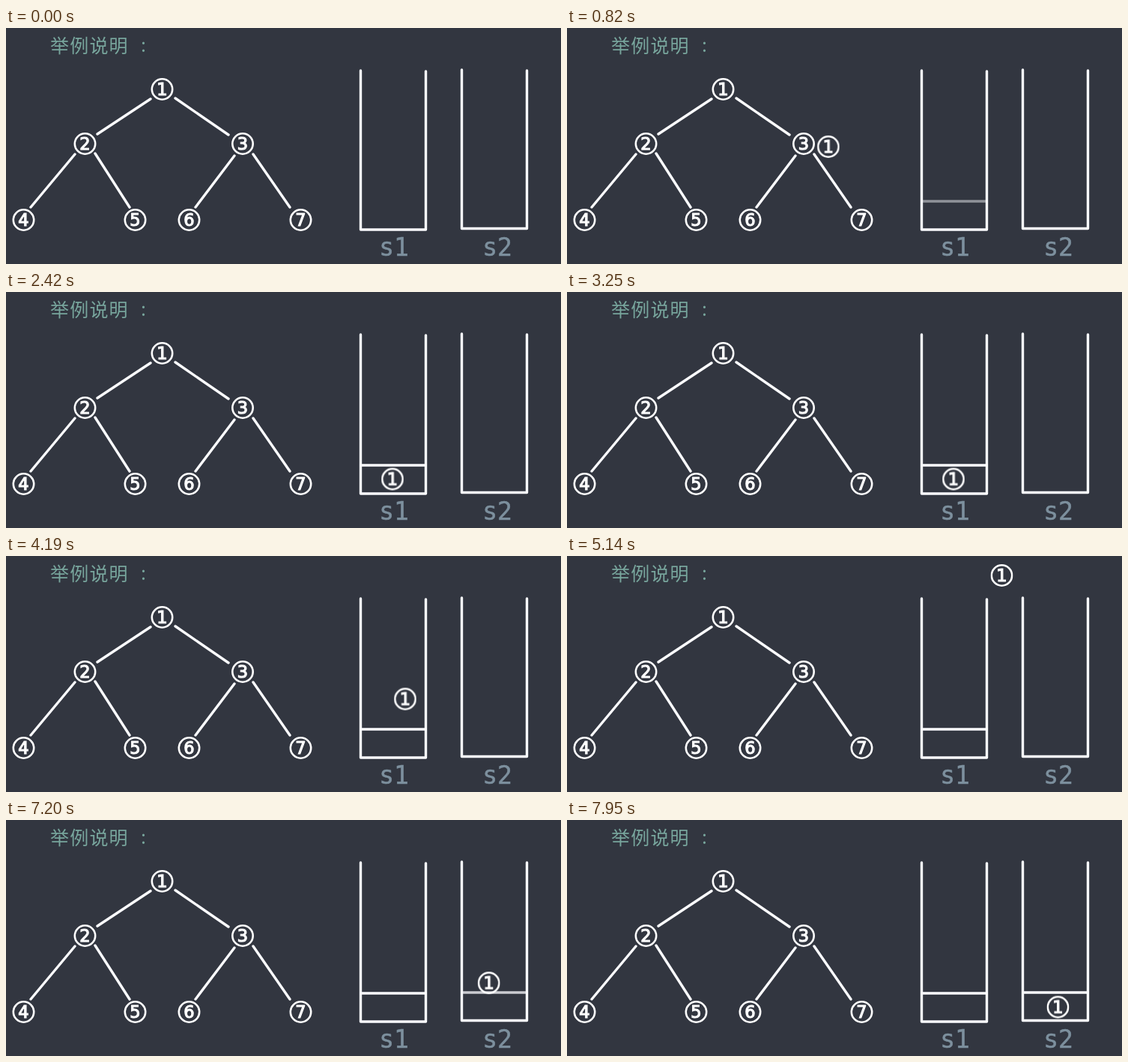
These frames come from a looping animation (741x316 px, 8 s). An HTML page:

```html
<!DOCTYPE html>
<html lang="zh">
<head>
<meta charset="utf-8">
<style>
  html, body { margin: 0; width: 100%; height: 100%; overflow: hidden; background: #323640; }
  svg { display: block; }
  .line { fill: none; stroke: #fbfcff; stroke-width: 3.4; stroke-linecap: round; stroke-linejoin: round; }
  .ring { fill: none; stroke: #fff; stroke-width: 2.6; }
  .digit { font: 22.5px "DejaVu Sans", sans-serif; fill: #fff; stroke: #fff; stroke-width: 1.2; text-anchor: middle; }
  .title { font: 500 25px "Noto Sans CJK SC", "Noto Sans CJK", sans-serif; letter-spacing: 1.2px; fill: #78a69d; }
  .label { font: 33px "DejaVu Sans Mono", monospace; fill: #7d909e; stroke: #7d909e; stroke-width: .5; text-anchor: middle; }
</style>
</head>
<body>
<svg id="stage" width="741" height="316" viewBox="0 0 741 316">
  <text class="title" x="59" y="32.5">举例说明</text>
  <text class="title" x="180" y="32">:</text>
  <path class="line" d="M193 95L122 142M226 94L297 143M92 169L33 240M119 168L165 240M305 171L253 240M330 169L379 240"/>
  <path class="line" d="M473.5 57V270H560.5V58M608.5 56V268.5H695.5V57"/>
  <path class="line" id="floor1" d="M474 232H560"/>
  <path class="line" id="floor2" d="M609 231H695"/>
  <text class="label" x="518" y="305">s1</text>
  <text class="label" x="656" y="305">s2</text>
</svg>
<script>
const LOOP = 8000, MOVE = 1000;
const PUSH_1 = 350, POP_1 = 3855, PUSH_2 = 6440;
const SMOOTH = 'cubic-bezier(.333, 0, .667, 1)';
const stage = document.getElementById('stage');

function add(parent, tag, attrs, text = '') {
  const el = document.createElementNS('http://www.w3.org/2000/svg', tag);
  for (const name in attrs) el.setAttribute(name, attrs[name]);
  el.textContent = text;
  return parent.appendChild(el);
}

function addNode(value, x, y) {
  const node = add(stage, 'g', { transform: `translate(${x} ${y})` });
  add(node, 'circle', { class: 'ring', r: 13.7 });
  add(node, 'text', { class: 'digit', y: 8.2 }, value);
  return node;
}

// steps: [time, properties, easing to the next step]
function play(el, steps) {
  const frames = steps.map(([time, props, easing = 'linear']) =>
    ({ offset: time / LOOP, easing, ...props }));
  el.animate(frames, { duration: LOOP, iterations: Infinity });
}

function fadeIn(id, start) {
  play(document.getElementById(id), [
    [0, { opacity: 0 }], [start, { opacity: 0 }],
    [start + MOVE, { opacity: 1 }], [LOOP, { opacity: 1 }]
  ]);
}

[[208.5, 82], [105.5, 155], [316, 155], [23.5, 257], [172.5, 257], [244.5, 257], [393.5, 257]]
  .forEach(([x, y], i) => addNode(i + 1, x, y));

const at = (x, y) => ({ transform: `translate(${x}px, ${y}px)` });
const root = at(208.5, 82), inS1 = at(516, 250.5), above = at(580.5, 26), inS2 = at(655.5, 250.5);
const ball = addNode(1, 208.5, 82);

play(ball, [
  [0, root], [PUSH_1, root, SMOOTH], [PUSH_1 + MOVE, inS1],
  [POP_1, inS1, SMOOTH], [POP_1 + MOVE, above],
  [PUSH_2, above, SMOOTH], [PUSH_2 + MOVE, inS2], [LOOP, inS2]
]);
play(ball, [
  [0, { opacity: 0 }, 'step-end'], [PUSH_1, { opacity: 1 }], [LOOP, { opacity: 1 }]
]);
fadeIn('floor1', PUSH_1);
fadeIn('floor2', PUSH_2);
</script>
</body>
</html>
```
